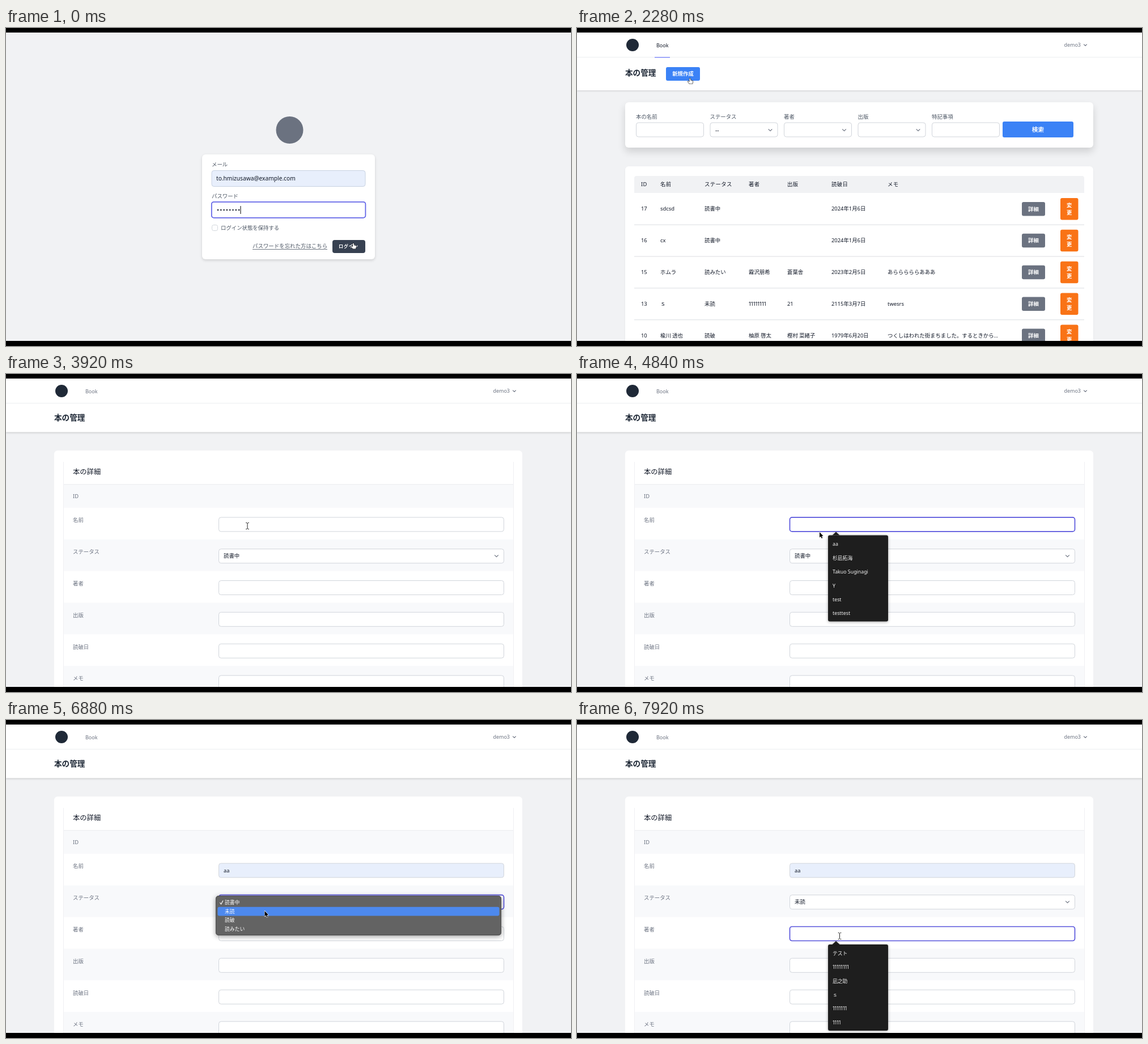
Recreate the animation shown at these times as an HTML page with a canvas. Size 997 by 561 pixels, loop 8000 ms.

```html
<!DOCTYPE html>
<html lang="ja">
<head>
<meta charset="utf-8">
<style>
html, body { margin: 0; width: 100%; height: 100%; overflow: hidden; background: #000; }
canvas { display: block; width: 997px; height: 561px; }
</style>
</head>
<body>
<canvas id="stage" width="997" height="561"></canvas>
<script>
const ctx = document.getElementById('stage').getContext('2d');
const LOOP = 8000;
const CJK = '"Noto Sans CJK JP", "Noto Sans CJK", sans-serif';
const INK = '#111827', GRAY = '#6b7280', LABEL = '#4b5563', BG = '#f1f2f4';
const BLUE = '#3b82f6', FOCUS = '#5753dc', BORDER = '#d1d5db', AUTOFILL = '#e8effc';

// Moments of the interaction, in ms
const T = {
  home: 520, create: 2520, nameFocus: 4000, nameList: 4080, preview: 5040, pick: 5200,
  statusFocus: 6000, menu: 6100, choose: 7120, authorFocus: 7380, authorList: 7460
};

// time, x, y of the pointer
const PATH = [
  [0, 613, 380], [600, 613, 380], [1000, 592.5, 359.5], [1320, 592.5, 359.5],
  [2240, 199.5, 89], [3160, 199.5, 89], [3920, 426, 268], [4400, 426, 268],
  [4800, 428, 279], [4880, 428, 279], [5100, 457, 298], [5680, 457, 298],
  [5960, 456, 326], [6720, 456, 326], [6860, 456.5, 337], [7140, 456.5, 337],
  [7360, 463.5, 381], [LOOP, 463.5, 381]
];

function pointer(t) {
  const i = PATH.findIndex(p => p[0] > t);
  const [t0, x0, y0] = PATH[i - 1], [t1, x1, y1] = PATH[i];
  const u = (t - t0) / (t1 - t0), e = u * u * (3 - 2 * u);
  return [x0 + (x1 - x0) * e, y0 + (y1 - y0) * e];
}

function rect(x, y, w, h, fill) {
  ctx.fillStyle = fill;
  ctx.fillRect(x, y, w, h);
}

function box(x, y, w, h, r, fill, stroke, lw = 1) {
  ctx.beginPath();
  ctx.roundRect(x, y, w, h, r);
  if (fill) { ctx.fillStyle = fill; ctx.fill(); }
  if (stroke) { ctx.strokeStyle = stroke; ctx.lineWidth = lw; ctx.stroke(); }
}

function shadowed(blur, dy, alpha, draw) {
  ctx.save();
  ctx.shadowColor = `rgba(0,0,0,${alpha})`;
  ctx.shadowBlur = blur;
  ctx.shadowOffsetY = dy;
  draw();
  ctx.restore();
}

// cy is the optical middle of the line
function text(s, x, cy, size = 9.4, color = INK, weight = 400, align = 'left', gap = 0) {
  const latin = /1{4}/.test(s) ? 'Inter' : '"Noto Sans"';
  ctx.font = `${weight} ${size}px ${latin}, ${CJK}`;
  ctx.letterSpacing = gap + 'px';
  ctx.textAlign = align;
  ctx.fillStyle = color;
  ctx.fillText(s, x, cy + size * 0.36);
}

function line(points, color, lw) {
  ctx.beginPath();
  points.forEach(([x, y]) => ctx.lineTo(x, y));
  ctx.strokeStyle = color;
  ctx.lineWidth = lw;
  ctx.stroke();
}

function chevron(x, y, r, color) {
  line([[x - r, y - r / 2], [x, y + r / 2], [x + r, y - r / 2]], color, 1.2);
}

function disc(x, y, r, color) {
  ctx.beginPath();
  ctx.arc(x, y, r, 0, Math.PI * 2);
  ctx.fillStyle = color;
  ctx.fill();
}

function button(s, x, y, w, h, fill, size = 9.4) {
  box(x, y, w, h, 3, fill);
  text(s, x + w / 2, y + h / 2, size, '#fff', 700, 'center');
}

function field(x, y, w, focused, fill = '#fff') {
  box(x + 0.5, y + 0.5, w - 1, 25, 4, fill, focused ? FOCUS : BORDER, focused ? 1.7 : 1);
}

function login() {
  disc(500.5, 180, 24, GRAY);
  shadowed(5, 2, 0.14, () => box(346, 223, 305, 185, 6, '#fff'));
  text('メール', 363, 241, 9.4, LABEL);
  box(363, 251.5, 271, 28, 4, AUTOFILL, '#c8d2e2');
  text('to.hmizusawa@example.com', 371, 265, 10.2);
  text('パスワード', 363, 296.5, 9.4, LABEL);
  box(362.8, 306.8, 271.6, 28, 4, '#fff', '#6366e8', 1.8);
  for (let i = 0; i < 8; i++) disc(374 + i * 5.3, 321, 1.25, INK);
  rect(413.5, 314, 1, 14, '#000');
  box(363.5, 347.5, 10, 10, 3, '#fff', BORDER);
  text('ログイン状態を保持する', 379, 352.5, 9.4, LABEL);
  text('パスワードを忘れた方はこちら', 435, 385, 9.45, LABEL);
  rect(435, 390, 132, 0.8, LABEL);
  box(576, 374, 58, 23, 4, '#374151');
  text('ログイン', 587, 385, 8.1, '#fff', 700, 'left', 0.6);
}

function header(bottom, active) {
  shadowed(3, 1, 0.16, () => rect(0, 8, 997, bottom - 8, '#fff'));
  rect(0, 51, 997, 1, '#eceef1');
  disc(98, 30, 11, '#1f2937');
  text('Book', 140, 30.5, 9, active ? INK : GRAY, 500);
  if (active) rect(137, 51, 27, 1.5, '#818cf8');
  text('demo3', 889, 30, 9, GRAY, 500, 'right');
  chevron(897, 30, 2.8, GRAY);
  text('本の管理', 85, active ? 79.5 : 77, 13.6, '#1f2937', 700);
}

const COLS = [113, 147, 225, 303, 371, 449, 548];
const HEADS = ['ID', '名前', 'ステータス', '著者', '出版', '読破日', 'メモ'];
const BOOKS = [
  ['17', 'sdcsd', '読書中', '', '', '2024年1月6日', ''],
  ['16', 'cx', '読書中', '', '', '2024年1月6日', ''],
  ['15', 'ホムラ', '読みたい', '霧沢朋希', '蒼葉舎', '2023年2月5日', 'あらららららあああ'],
  ['13', 'ｓ', '未読', '11111111', '21', '2115年3月7日', 'twesrs'],
  ['10', '楡川 透也', '読破', '柚原 啓太', '樫村 菜緒子', '1979年6月20日', 'つくしはわれた街まちました。するときから...']
];

function home() {
  header(110, true);
  button('新規作成', 157, 69, 60, 24, BLUE);
  shadowed(14, 7, 0.14, () => box(85, 131, 826, 80, 6, '#fff'));
  ['本の名前', 'ステータス', '著者', '出版', '特記事項'].forEach((s, i) => {
    const x = 104 + i * 130.5;
    text(s, x, 157, 9.4, LABEL);
    field(x, 166.5, 120);
    if (i > 0 && i < 4) chevron(x + 106.5, 180, 3.3, GRAY);
  });
  text('--', 244, 180, 10);
  button('検索', 751, 165, 125, 28, BLUE, 10.7);

  shadowed(3, 1, 0.06, () => box(85, 244, 826, 330, 6, '#fff'));
  box(101, 261, 794, 30, [4, 4, 0, 0], BG);
  HEADS.forEach((s, i) => text(s, COLS[i], 275.5, 9.4, INK, 500, 'left', 0.4));
  BOOKS.forEach((book, r) => {
    const y = 319 + r * 55.85;
    book.forEach((s, i) => text(s, COLS[i], y, 9.4));
    button('詳細', 785, y - 12, 41, 24.5, GRAY);
    box(853, y - 19, 31.5, 38.5, 3, '#f97316');
    text('変', 868.7, y - 6.5, 9.4, '#fff', 700, 'center');
    text('更', 868.7, y + 7, 9.4, '#fff', 700, 'center');
    rect(101, y + 27.5, 794, 1.3, '#e3e5e9');
  });
}

function suggestions(y, items, hover) {
  shadowed(5, 1, 0.35, () => {
    box(443, y, 106, 152, 3, '#1e1e1e');
    ctx.beginPath();
    ctx.moveTo(450.5, y);
    ctx.lineTo(457, y - 6);
    ctx.lineTo(463.5, y);
    ctx.fill();
  });
  if (hover) rect(443, y + 3, 106, 24.5, '#3b3b3d');
  items.forEach((s, i) => text(s, 451, y + 15.5 + i * 24.45, 8.8, '#f3f3f3'));
}

const STATES = ['読書中', '未読', '読破', '読みたい'];

function statusMenu(py) {
  shadowed(9, 2, 0.4, () => box(370, 310, 504, 70, 5, '#636363'));
  box(370.5, 310.5, 503, 69, 5, null, '#4c4c4c');
  const on = py > 330 ? 1 : 0;
  box(373.5, 314 + on * 15.7, 497, 15.7, 3, '#4d89ee');
  STATES.forEach((s, i) => text(s, 386, 322 + i * 15.65, 8.8, '#fff'));
  line([[377.5, 322], [379.5, 325], [383, 318.5]], '#fff', 1.2);
}

function caret(t, start, y) {
  if (t >= start && (t - start) % 1000 < 500) rect(384, y - 6.5, 1, 13, '#222');
}

function detail(t, py) {
  header(102.5, false);
  box(85, 135, 826, 440, 6, '#fff');
  rect(101, 155, 1, 397, '#eff0f3');
  rect(895, 155, 1, 397, '#eff0f3');
  text('本の詳細', 118, 172.5, 12.3);
  rect(102, 194.5, 793, 1, '#e1e4e8');
  rect(102, 195.5, 793, 40.5, '#f8f9fb');
  text('ID', 118, 216, 9.4, GRAY, 500);

  const filled = t >= T.preview;
  const focus = t < T.nameFocus ? -1 : t < T.statusFocus ? 0 : t < T.authorFocus ? 1 : 2;
  HEADS.slice(1).forEach((s, i) => {
    const y = 236 + i * 55.8;
    if (i % 2) rect(102, y, 793, 55.8, '#f8f9fb');
    text(s, 118, y + 22, 9.4, GRAY);
    field(375, y + 16.4, 504, i === focus, i === 0 && filled ? AUTOFILL : '#fff');
  });
  if (filled) text('aa', 384, 265.5, 9.2, INK, 500);
  text(STATES[t < T.choose ? 0 : 1], 384, 321, 9.4);
  chevron(865.5, 321, 3.3, GRAY);

  if (focus === 0 && !filled) caret(t, T.nameFocus, 265.5);
  if (focus === 2) caret(t, T.authorFocus, 377);
  if (t >= T.nameList && t < T.pick)
    suggestions(284.5, ['aa', '杉凪拓海', 'Takuo Suginagi', 'Y', 'test', 'testtest'], filled);
  if (t >= T.menu && t < T.choose) statusMenu(py);
  if (t >= T.authorList)
    suggestions(396, ['テスト', '11111111', '凪之助', 'ｓ', '1111111', '1111']);
}

function shape(x, y, points, fill, stroke) {
  ctx.beginPath();
  points.forEach(([a, b]) => ctx.lineTo(x + a, y + b));
  ctx.closePath();
  ctx.lineWidth = 1.2;
  ctx.lineJoin = 'round';
  ctx.strokeStyle = stroke;
  ctx.stroke();
  ctx.fillStyle = fill;
  ctx.fill();
}

const ARROW = [[0, 0], [0, 9.5], [2.2, 7.6], [3.7, 11], [5.3, 10.3], [3.8, 7], [6.5, 6.8]];
const HAND = [[-1, 0], [0.8, 0], [0.8, 3.2], [4.5, 4], [5, 5.5], [4, 9.5], [-1, 9.5], [-4, 5.5], [-3, 4.7], [-1, 6]];

function cursor(t, x, y) {
  const onButton = t < T.home || (t > 1900 && t < T.create && x < 217 && y < 93);
  const onName = t > T.create && t < T.pick && x > 375 && y > 253 && y < 278.5;
  const onAuthor = t > T.choose && y > 364;
  if (onButton) shape(x, y, HAND, '#fff', '#111');
  else if (onName || onAuthor) {
    for (const [color, lw] of [['#fff', 2.4], ['#222', 1]]) {
      line([[x, y - 5], [x, y + 5]], color, lw);
      line([[x - 2.8, y - 5.7], [x - 1, y - 5.5], [x, y - 4.5], [x + 1, y - 5.5], [x + 2.8, y - 5.7]], color, lw);
      line([[x - 2.8, y + 5.7], [x - 1, y + 5.5], [x, y + 4.5], [x + 1, y + 5.5], [x + 2.8, y + 5.7]], color, lw);
    }
  } else shape(x, y, ARROW, '#000', '#fff');
}

function draw(t) {
  const [x, y] = pointer(t);
  rect(0, 0, 997, 561, BG);
  if (t < T.home) login();
  else if (t < T.create) home();
  else detail(t, y);
  cursor(t, x, y);
  rect(0, 0, 997, 8, '#000');
  rect(0, 552, 997, 9, '#000');
}

const start = performance.now();
function tick() {
  draw((performance.now() - start) % LOOP);
  requestAnimationFrame(tick);
}
tick();
</script>
</body>
</html>
```
